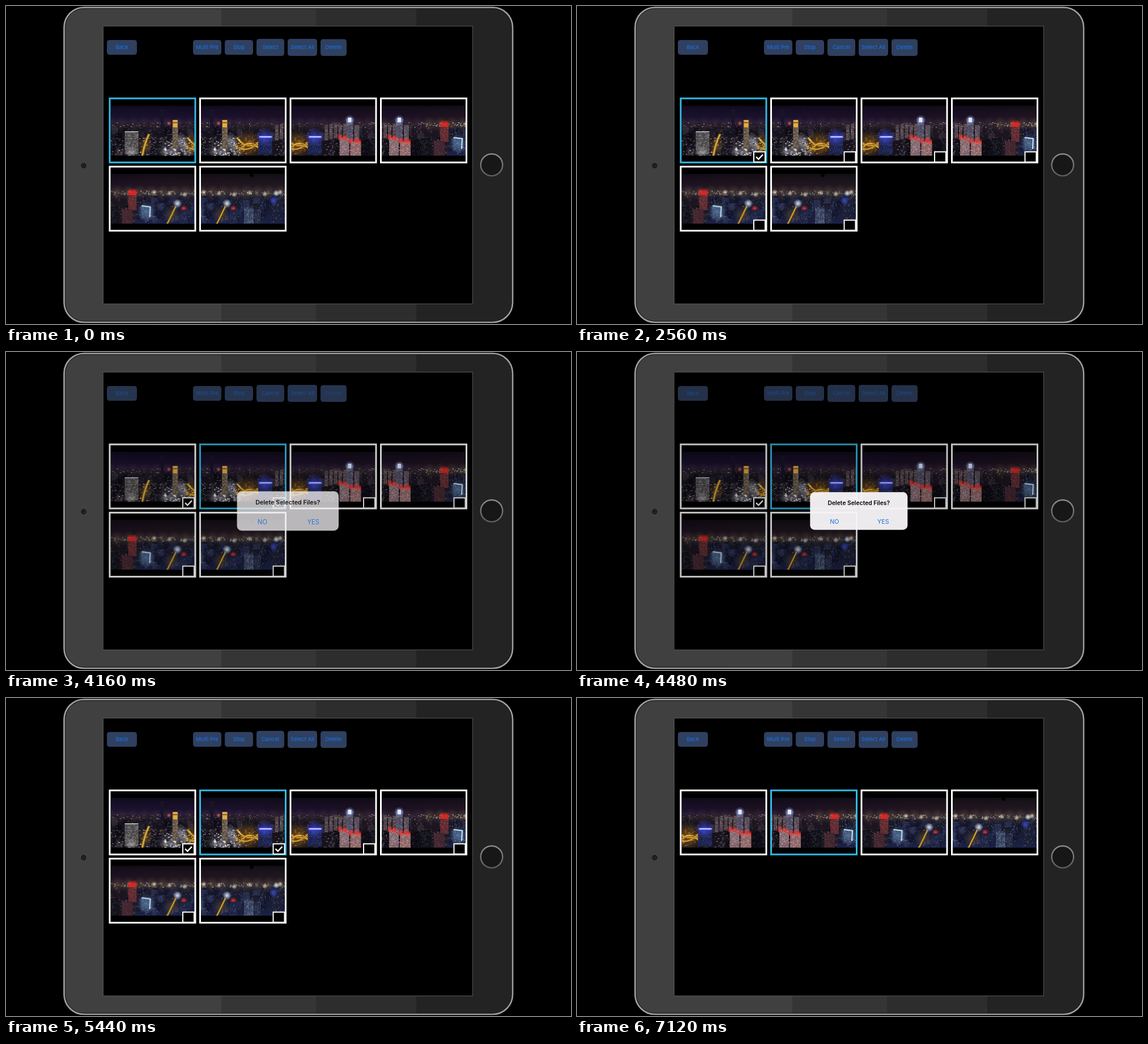
Animation of 997x561 px, one loop 7.28 s. Source, as an HTML page with a canvas:

```html
<!DOCTYPE html>
<html lang="en">
<head>
<meta charset="utf-8">
<title>Delete selected files</title>
<style>
  html, body { margin: 0; width: 100%; height: 100%; overflow: hidden; background: #000; }
  canvas { display: block; width: 997px; height: 561px; }
</style>
</head>
<body>
<canvas id="stage" width="997" height="561"></canvas>
<script>
const LOOP = 7280, STEP = 80;
const FONT = 'Inter, Roboto, sans-serif';
const PHOTO_W = 148, PHOTO_H = 88, SHIFT = 72;
const ctx = document.getElementById('stage').getContext('2d');

const clamp = v => Math.max(0, Math.min(1, v));
const ramp = (t, from, to) => clamp((t - from) / (to - from));

function layer(w, h) {
  const c = document.createElement('canvas');
  c.width = w;
  c.height = h;
  return c;
}

function roundRect(c, x, y, w, h, r) {
  c.beginPath();
  c.roundRect(x, y, w, h, r);
}

// One wide night skyline; each photo is an overlapping window on it.
function makeSkyline() {
  const W = SHIFT * 5 + PHOTO_W, H = PHOTO_H;
  const img = layer(W, H), c = img.getContext('2d');
  let seed = 41;
  const rnd = () => (seed = (seed * 16807) % 2147483647) / 2147483647;
  const pick = list => list[Math.floor(rnd() * list.length)];

  function fade(x0, y0, x1, y1, colors) {
    const g = c.createLinearGradient(x0, y0, x1, y1);
    colors.forEach((col, i) => g.addColorStop(i / (colors.length - 1), col));
    return g;
  }
  function rect(x, y, w, h, col) {
    c.fillStyle = col;
    c.fillRect(x, y, w, h);
  }
  function dots(n, x0, x1, y0, y1, cols, size = 1) {
    for (let i = 0; i < n; i++) {
      c.globalAlpha = 0.2 + rnd() * 0.7;
      rect(x0 + rnd() * (x1 - x0), y0 + rnd() * (y1 - y0),
        size * (0.6 + rnd()), size * (0.5 + rnd() * 0.7), pick(cols));
    }
    c.globalAlpha = 1;
  }
  function tower(x, y, w, h, body, lit, density = 0.5) {
    rect(x, y, w, h, body);
    for (let yy = y + 1; yy < y + h - 1; yy += 2)
      for (let xx = x + 0.5; xx < x + w - 1; xx += 2)
        if (rnd() < density) {
          c.globalAlpha = 0.15 + rnd() * 0.6;
          rect(xx + rnd() * 0.6, yy + rnd() * 0.6, 1.4, 1.2, lit);
        }
    c.globalAlpha = 1;
  }
  function glow(x, y, r, col, alpha = 1) {
    const g = c.createRadialGradient(x, y, 0, x, y, r);
    g.addColorStop(0, col);
    g.addColorStop(1, col + '00');
    c.globalAlpha = alpha;
    c.fillStyle = g;
    c.fillRect(x - r, y - r, 2 * r, 2 * r);
    c.globalAlpha = 1;
  }
  function road(x0, y0, cx, cy, x1, y1, w) {
    for (const [col, width] of [['#6b470888', w + 2], ['#b27f1c', w], ['#f5d268', w * 0.35]]) {
      c.strokeStyle = col;
      c.lineWidth = width;
      c.beginPath();
      c.moveTo(x0, y0);
      c.quadraticCurveTo(cx, cy, x1, y1);
      c.stroke();
    }
  }

  // Sky, ground and the lights along the horizon.
  rect(0, 0, W, H, fade(0, 0, W, 0, ['#1b1230', '#1b112e', '#1c1122', '#23171f', '#201a1f']));
  rect(0, 0, W, 34, fade(0, 0, 0, 34, ['#06040c88', '#120b1c33', '#4a384a33']));
  rect(0, 30, W, H - 30, fade(0, 0, W, 0,
    ['#16131e', '#15121f', '#17121b', '#1c1520', '#191a2c', '#191b2a']));
  rect(330, 56, W - 330, 32, fade(0, 56, 0, H, ['#1b214400', '#1b2147']));
  for (let x = 0; x < W; x += 20) glow(x, 33, 14, x > 280 ? '#8a7458' : '#5c4658', 0.35);
  dots(150, 0, 280, 29, 37, ['#d99a5c', '#ffe2b8', '#8f7090', '#b05a48'], 1.2);
  dots(210, 280, W, 29, 37, ['#e8c890', '#fff0cf', '#a98764', '#ffffff'], 1.3);
  dots(420, 0, W, 36, 60, ['#a98d74', '#6f6884', '#54567e', '#d8c9b4', '#7c4a44'], 1.2);

  // Irregular blocks filling the city.
  for (let i = 0; i < 130; i++) {
    const x = rnd() * W, y = 36 + i * 0.33, blue = x > 330;
    c.globalAlpha = 0.75;
    tower(x, y, 4 + rnd() * 9, 6 + rnd() * 12,
      blue ? pick(['#151a33', '#23294a', '#10132a', '#2b3152']) : pick(['#12101b', '#221e2a', '#0b0a12', '#322b34']),
      blue ? pick(['#6673ad', '#8d96bd']) : pick(['#a3917c', '#77748f', '#cfc4b4']), 0.18);
  }
  dots(190, 0, 100, 56, H, ['#b8b0a8', '#efe9df', '#8c806c', '#d8ac68'], 1.5);
  dots(130, 200, 330, 58, H, ['#b06a64', '#d6caca', '#77778f'], 1.4);
  dots(130, 330, W, 54, H, ['#4f5c9c', '#9ca6cc', '#39488d'], 1.4);

  // Left: pale block, avenue, gold-topped tower and bright low houses.
  tower(88, 6, 6, 35, '#191327', '#2b2344', 0.3);
  tower(25, 46, 24, 39, '#4a474a', '#e6e1da', 0.6);
  rect(25, 45, 24, 1.5, '#c8c6c8');
  glow(37, 84, 12, '#ffffff', 0.4);
  glow(62, 70, 16, '#c48a28', 0.4);
  road(56, 88, 60, 66, 68, 50, 3.6);
  tower(71, 66, 20, 22, '#14131b', '#a9a8b4', 0.35);
  for (const [x, y] of [[98, 80], [112, 82], [126, 70], [136, 80], [123, 60]]) glow(x, y, 13, '#cfcbd0', 0.5);
  dots(130, 94, 140, 56, H, ['#ffffff', '#fff1cc', '#c4d2e8', '#1a1820'], 2.4);
  tower(109, 25, 10, 50, '#5c5046', '#e2c48e', 0.6);
  rect(110, 25, 8, 13, '#e3ab42');
  rect(110, 29, 8, 1.5, '#6e4515');
  glow(103, 31, 4, '#ff5060');

  // Centre: interchange, blue-lit block, housing and red roofs.
  glow(155, 68, 26, '#b8791a', 0.6);
  road(136, 56, 148, 78, 180, 66, 3);
  road(140, 78, 158, 54, 178, 79, 3.4);
  road(132, 70, 154, 86, 173, 64, 2.2);
  dots(90, 134, 177, 55, 84, ['#ffbd35', '#ffe99a', '#e18812', '#3a2810'], 1.8);
  tower(173, 52, 25, 34, '#1b2148', '#5867b8', 0.45);
  glow(185, 55, 17, '#4b55ff', 0.7);
  rect(174, 53, 24, 4, '#656dff');
  rect(176, 54, 20, 1.4, '#e2e8ff');
  for (let x = 203; x < 240; x += 8)
    tower(x, 30 + x % 3 * 1.5, 6, 28, '#4a3e46', '#cbbab6', 0.5);
  tower(241, 23, 12, 43, '#4a465c', '#c9c3dc', 0.55);
  glow(247, 25, 9, '#93b0ff');
  rect(244, 21, 6, 8, '#e6edff');
  tower(255, 34, 9, 30, '#554a55', '#d2bec6', 0.5);
  tower(229, 56, 17, 32, '#7c6068', '#f6e2e0', 0.6);
  tower(248, 63, 21, 25, '#8a6264', '#ffe4dc', 0.6);
  for (const [x, y] of [[230, 55], [239, 57], [249, 62], [258, 61], [265, 64]]) glow(x, y, 6, '#ff3028');
  tower(267, 61, 19, 27, '#0c0b13', '#55566e', 0.25);
  tower(285, 57, 18, 31, '#111119', '#76778e', 0.25);

  // Right: red tower, cyan outline, avenue and blue blocks.
  tower(319, 32, 15, 32, '#5a2a30', '#c86a62', 0.45);
  rect(319, 35, 15, 2, '#b72f2a');
  glow(323, 32, 7, '#ff2923');
  glow(330, 32, 7, '#ff2923');
  tower(308, 62, 19, 26, '#40252f', '#8c5e64', 0.3);
  tower(341, 56, 20, 24, '#28304a', '#a3b9d7', 0.35);
  glow(351, 66, 18, '#7aa8db', 0.5);
  c.strokeStyle = '#c8edff';
  c.lineWidth = 2;
  c.beginPath();
  c.moveTo(343, 56);
  c.lineTo(358, 58);
  c.lineTo(357, 76);
  c.stroke();
  glow(396, 72, 15, '#8c7434', 0.4);
  road(388, 88, 397, 70, 403, 57, 2.4);
  glow(406, 52, 8, '#ddeaff');
  glow(417, 61, 6, '#ff302e');
  tower(411, 63, 13, 25, '#1f2340', '#7186bf', 0.35);
  tower(436, 60, 17, 28, '#35405c', '#c4d3ea', 0.55);
  tower(454, 62, 12, 26, '#22283f', '#899dca', 0.4);
  tower(485, 37, 18, 46, '#1b1e34', '#8191be', 0.25);
  glow(493, 34, 6, '#e0efff');
  glow(488, 47, 8, '#4458f0', 0.8);
  for (let x = 365; x < W; x += 27) glow(x, 32 + x % 5, 5, '#ffebc8', 0.8);
  c.fillStyle = '#000';
  c.beginPath();
  c.arc(449.5, 2, 3.2, 0, 7);
  c.fill();

  const soft = layer(W, H), s = soft.getContext('2d');
  s.drawImage(img, 0, 0);
  s.filter = 'blur(0.7px)';
  s.drawImage(img, 0, 0);
  return soft;
}

function makeDevice() {
  const img = layer(997, 561), c = img.getContext('2d');
  c.fillStyle = '#000';
  c.fillRect(0, 0, 997, 561);
  const body = c.createLinearGradient(102, 0, 894, 0);
  const bands = [[102, '#404040'], [380, '#353535'], [547, '#2d2d2d'], [724, '#232323'], [894]];
  for (let i = 0; i < bands.length - 1; i++) {
    body.addColorStop((bands[i][0] - 102) / 792, bands[i][1]);
    body.addColorStop((bands[i + 1][0] - 102) / 792, bands[i][1]);
  }
  roundRect(c, 102.5, 2.5, 791.5, 555.5, 35);
  c.fillStyle = body;
  c.fill();
  c.lineWidth = 2.6;
  c.strokeStyle = '#a0a0a0';
  c.stroke();
  roundRect(c, 104.6, 4.6, 787.3, 551.3, 33);
  c.lineWidth = 1;
  c.strokeStyle = '#1c1c1c';
  c.stroke();

  c.fillStyle = '#000';
  c.fillRect(171, 36, 652, 489);
  c.strokeStyle = '#555';
  c.strokeRect(171.5, 35.5, 652, 490);

  const ring = c.createLinearGradient(0, 260, 0, 300);
  ring.addColorStop(0, '#8e8e8e');
  ring.addColorStop(1, '#5c5c5c');
  c.beginPath();
  c.arc(857, 280.3, 19.3, 0, 7);
  c.fillStyle = '#171717';
  c.fill();
  c.lineWidth = 2.4;
  c.strokeStyle = ring;
  c.stroke();

  for (const [r, col] of [[4.6, '#151515'], [2.6, '#333'], [1.4, '#0a0a0a']]) {
    c.beginPath();
    c.arc(137, 281.7, r, 0, 7);
    c.fillStyle = col;
    c.fill();
  }
  return img;
}

function label(text, x, y, size, color, weight = 400) {
  ctx.font = `${weight} ${size}px ${FONT}`;
  ctx.textAlign = 'center';
  ctx.textBaseline = 'middle';
  ctx.fillStyle = color;
  ctx.fillText(text, x, y);
}

function button(text, x, y, w, h, alpha) {
  roundRect(ctx, x, y, w, h, 4.5);
  ctx.fillStyle = '#2f4060';
  ctx.fill();
  ctx.globalAlpha = alpha;
  label(text, x + w / 2, 73.5, 9.5, '#1876ec');
  ctx.globalAlpha = 1;
}

function checkbox(x, y, checked) {
  ctx.fillStyle = '#000';
  ctx.fillRect(x, y, 20, 18);
  ctx.strokeStyle = '#fff';
  ctx.lineWidth = 2;
  ctx.strokeRect(x, y, 20, 18);
  if (!checked) return;
  ctx.lineWidth = 2.5;
  ctx.beginPath();
  ctx.moveTo(x + 4, y + 8.8);
  ctx.lineTo(x + 8.3, y + 13);
  ctx.lineTo(x + 16, y + 4.8);
  ctx.stroke();
}

function cell(slot, photo, active, box, checked) {
  const x = 181.5 + slot % 4 * 159.5, y = 161.5 + Math.floor(slot / 4) * 120.4;
  ctx.drawImage(skyline, photo * SHIFT, 0, PHOTO_W, PHOTO_H, x + 3, y + 14.5, PHOTO_W, PHOTO_H);
  ctx.strokeStyle = active ? '#36b9e4' : '#fff';
  ctx.lineWidth = 3;
  ctx.strokeRect(x + 1.5, y + 1.5, 151, 113);
  if (box) checkbox(x + 130.5, y + 95.8, checked);
}

function alertBox(shown, scale) {
  ctx.save();
  ctx.translate(497.3, 280.5);
  ctx.scale(scale, scale);
  ctx.globalAlpha = shown * 0.96;
  roundRect(ctx, -86, -33.2, 172, 66.4, 8);
  ctx.fillStyle = '#f6f4f6';
  ctx.fill();
  ctx.globalAlpha = Math.sqrt(shown);
  label('Delete Selected Files?', 0, -14, 10.3, '#050505', 600);
  label('NO', -43, 19.5, 10.7, '#1a6fdc');
  label('YES', 43, 19.5, 10.7, '#1a6fdc');
  ctx.restore();
}

// The mode button fades its old title out before the new one comes in.
function modeTitle(t) {
  if (t < 1360) return ['Select', 1 - ramp(t, 960, 1360)];
  if (t < 5680) return ['Cancel', ramp(t, 1440, 1760)];
  return ['Select', ramp(t, 5760, 6080)];
}

function draw(t) {
  const deleted = t >= 5760;
  const selecting = t >= 1360 && !deleted;
  const active = t < 2880 ? 0 : 1;
  const checks = [t >= 2400, t >= 2880];
  const enter = 1 - (1 - ramp(t, 4000, 4400)) ** 3;
  const shown = enter * (1 - ramp(t, 4880, 5200));
  const tint = shown > 0 ? 0.65 : 1;
  const pressed = t >= 3920 && t < 4400 ? 0.5 : 1;

  ctx.drawImage(device, 0, 0);
  const [mode, alpha] = modeTitle(t);
  button('Back', 178, 60, 53, 26, tint);
  button('Multi Pre', 330, 60, 50, 26, tint);
  button('Stop', 386, 60, 50, 26, tint);
  button(mode, 442, 58, 49, 30, alpha * tint);
  button('Select All', 497, 58, 52, 30, tint);
  button('Delete', 555, 58.5, 46, 29.5, tint * pressed);

  const first = deleted ? 2 : 0;
  for (let photo = first; photo < 6; photo++) {
    const slot = photo - first;
    cell(slot, photo, slot === active, selecting, checks[slot]);
  }
  if (shown > 0) {
    ctx.fillStyle = `rgba(0,0,0,${0.24 * shown})`;
    ctx.fillRect(171, 36, 652, 489);
    alertBox(shown, 1.2 - 0.2 * enter);
  }
}

const skyline = makeSkyline();
const device = makeDevice();
const start = performance.now();

function tick(now) {
  const t = Math.max(0, now - start) % LOOP;
  draw(Math.floor(t / STEP) * STEP);
  requestAnimationFrame(tick);
}
draw(0);
requestAnimationFrame(tick);
</script>
</body>
</html>
```
